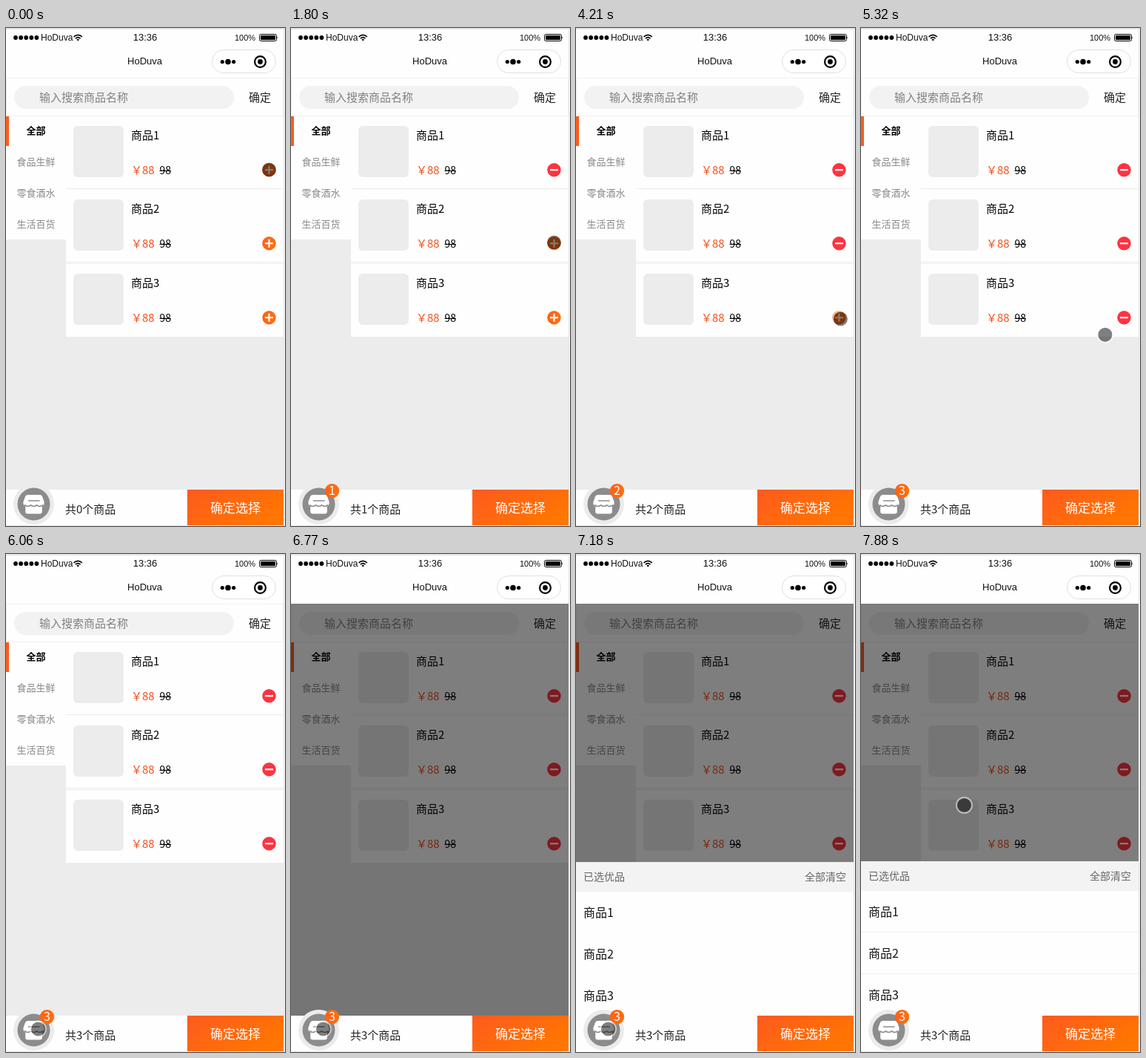
Write an HTML page that moves like this. It is 377x671 px and loops after 8 s.

```html
<!DOCTYPE html>
<html lang="zh">
<head>
<meta charset="utf-8">
<title>Shop picker</title>
<style>
html, body { margin: 0; width: 100%; height: 100%; overflow: hidden; background: #fff; }
svg { display: block; width: 100vw; height: 100vh; }
text { font-family: "Noto Sans CJK SC", "Noto Sans CJK JP", "Noto Sans CJK", sans-serif; font-size: 15px; fill: #111; }
.sys { font-family: "Liberation Sans", Arial, sans-serif; }
.mid { text-anchor: middle; }
.end { text-anchor: end; }
.grey { fill: #888; }
</style>
</head>
<body>
<svg viewBox="0 0 377 671" preserveAspectRatio="none">
  <defs>
    <linearGradient id="warm" x1="0" y1="0" x2="1" y2=".6">
      <stop offset="0" stop-color="#ff5a1f"/>
      <stop offset="1" stop-color="#ff7600"/>
    </linearGradient>
    <linearGradient id="disc" x1="0" y1="0" x2="1" y2="0">
      <stop offset="0" stop-color="#ff6216"/>
      <stop offset="1" stop-color="#ff700c"/>
    </linearGradient>
  </defs>

  <rect width="377" height="671" fill="#e6e6e6"/>
  <rect y="2" width="375" height="65" fill="#fefefe"/>
  <rect x="376" y="2" width="1" height="669" fill="#f6f6f6"/>
  <rect y="67" width="375" height="603" fill="#ececec"/>

  <!-- status bar -->
  <g id="signal"></g>
  <text class="sys" x="47" y="17" style="font-size:12px">HoDuva</text>
  <g fill="none" stroke="#000" stroke-width="1.7">
    <path d="M91.6 11.9Q97.2 6.9 102.8 11.9"/>
    <path d="M93.9 14.1Q97.2 11.1 100.5 14.1"/>
  </g>
  <path d="M95.4 15.4Q97.2 13.9 99 15.4L97.2 17.6Z"/>
  <text class="sys mid" x="188" y="17" style="font-size:13px">13:36</text>
  <text class="sys" x="309" y="17" style="font-size:11px">100%</text>
  <rect x="342.5" y="8.5" width="23" height="9" rx="2" fill="none" stroke="#000"/>
  <rect x="344" y="10" width="20" height="6" rx=".8"/>
  <path d="M366.5 11.2q1.6 1.8 0 3.6z"/>

  <!-- title bar -->
  <text class="sys mid" x="187.5" y="49" style="font-size:13px">HoDuva</text>
  <rect x="278.5" y="29.5" width="86" height="31" rx="15.5" fill="#fff" stroke="#e0e0e0"/>
  <circle cx="292.3" cy="45.5" r="2.6"/>
  <circle cx="300" cy="45.5" r="3.8"/>
  <circle cx="307.7" cy="45.5" r="2.6"/>
  <circle cx="343.5" cy="45.5" r="7.4" fill="none" stroke="#000" stroke-width="2.2"/>
  <circle cx="343.5" cy="45.5" r="3.4"/>

  <!-- search -->
  <rect x=".5" y="67.5" width="374" height="51" fill="#fefefe" stroke="#f1f1f1"/>
  <rect x="11" y="78" width="297" height="31" rx="15.5" fill="#f2f2f2"/>
  <text x="45" y="99" style="fill:#808080">输入搜索商品名称</text>
  <text x="328" y="99" style="fill:#222">确定</text>

  <!-- categories -->
  <rect y="119" width="81" height="166" fill="#fefefe"/>
  <rect y="119" width="4" height="40" fill="#ff5b1c"/>
  <g id="menu"></g>

  <g id="list"></g>
  <g id="mask"><rect y="67" width="375" height="555" fill="#000" opacity=".5"/></g>

  <!-- selection sheet -->
  <g id="sheet">
    <rect width="375" height="256" fill="#fefefe"/>
    <rect width="375" height="40" fill="#f3f3f3"/>
    <text x="10" y="25" style="font-size:14px;fill:#666">已选优品</text>
    <text class="end" x="365" y="25" style="font-size:14px;fill:#666">全部清空</text>
    <g id="picked"></g>
    <path id="rules" d="M0 95.5H375M0 151.5H375" stroke="#f0f0f0"/>
  </g>

  <!-- bottom bar -->
  <rect y="622" width="375" height="48" fill="#fefefe"/>
  <rect x="245" y="622" width="130" height="48" fill="url(#warm)"/>
  <text class="mid" x="310" y="653" style="font-size:17px;fill:#fff">确定选择</text>
  <text id="total" x="80" y="654" style="fill:#222"></text>
  <circle cx="37.5" cy="641.5" r="27.5" fill="#ebebeb"/>
  <circle cx="37.5" cy="641.5" r="22" fill="#8c8c8c"/>
  <path d="M30 629H45.5Q48 629 49 631.3L51.6 638.5Q52 643 48.8 644.3V651.5Q48.8 654.5 45.8 654.5H29.2Q26.2 654.5 26.2 651.5V644.3Q23 643 23.4 638.5L26 631.3Q27 629 30 629Z" fill="#fff"/>
  <path d="M30.5 637H45M25.5 642.8Q29.5 646.2 33.5 642.8Q37.5 646.2 41.5 642.8Q45.5 646.2 49.5 642.8" fill="none" stroke="#8c8c8c" stroke-width="1.6" stroke-linecap="round"/>
  <g id="badge">
    <circle cx="55.5" cy="623.7" r="9.7" fill="url(#disc)"/>
    <text id="count" class="mid" x="55.5" y="629.3" style="font-size:16px;fill:#fff"></text>
  </g>

  <g id="cursor">
    <circle r="9.6" fill="#000" opacity=".5"/>
    <circle r="10.5" fill="none" stroke="#fff" stroke-width="2" opacity=".5"/>
  </g>
</svg>
<script>
const LOOP = 8000;
const $ = id => document.getElementById(id);
const show = (el, on) => el.setAttribute("display", on ? "inline" : "none");
const place = (el, x, y) => el.setAttribute("transform", `translate(${x} ${y})`);
const each = (n, draw) => Array.from({ length: n }, (_, i) => draw(i)).join("");

$("signal").innerHTML = each(5, i => `<circle cx="${13 + i * 7.1}" cy="13" r="2.9"/>`);

$("menu").innerHTML = ["全部", "食品生鲜", "零食酒水", "生活百货"].map((name, i) =>
  `<text class="mid ${i ? "grey" : ""}" x="40.5" y="${143 + i * 42}"
    style="font-size:13px;${i ? "" : "font-weight:bold;fill:#000"}">${name}</text>`).join("");

const rowTop = i => Math.round(119 + i * 99.4);
$("list").innerHTML = each(3, i => `<g transform="translate(81 ${rowTop(i)})">
  <rect width="294" height="${i < 2 ? 99 : 98}" fill="#fefefe"/>
  ${i < 2 ? '<path d="M0 97.5H294" stroke="#ebebeb"/>' : ""}
  <rect x="10" y="13" width="68" height="69" rx="6" fill="#ececec"/>
  <text x="88" y="31" style="fill:#000">商品${i + 1}</text>
  <text x="88" y="78" style="fill:#f0521f">￥88</text>
  <text x="126.5" y="78" style="font-size:14px;fill:#000">98</text>
  <path d="M126.5 73.5H142" stroke="#000"/>
  <g transform="translate(274.5 72.2)" stroke="#fff" stroke-width="2.2">
    <circle id="disc${i}" r="9.2" stroke="none"/>
    <path d="M-5.5 0H5.5"/>
    <path id="bar${i}" d="M0 -5.5V5.5"/>
  </g>
</g>`);

$("picked").innerHTML = each(3, i =>
  `<text x="10" y="${74 + i * 56}" style="font-size:16px">商品${i + 1}</text>`);

const taps = [400, 2520, 4780];

// begin, end, steps, x, y
const home = [355.5, 191];
const moves = [
  [1110, 1800, 6, 355.5, 289],
  [3760, 4210, 4, 357.5, 392],
  [5190, 5750, 5, 92, 597],
  [5900, 6060, 2, 43.5, 640],
  [7300, 7720, 4, 139.5, 341.5],
  [7880, 7880, 1, 139.5, 338.5]
];

const smooth = p => p * p * (3 - 2 * p);

function cursorAt(t) {
  let [x, y] = home;
  for (const [begin, end, steps, tx, ty] of moves) {
    if (t < begin) break;
    const step = t >= end ? steps : Math.floor((t - begin) / (end - begin) * (steps - 1)) + 1;
    const p = smooth(step / steps);
    x += (tx - x) * p;
    y += (ty - y) * p;
  }
  return [x, y];
}

const OPEN = 6770, SLIDE = 6800, SETTLED = 7300;

function sheetTop(t) {
  if (t >= SETTLED) return 414;
  const p = Math.min(1, Math.max(0, (t - SLIDE) / 420));
  return 415 + 255 * (1 - p) ** 3;
}

function render(t) {
  const count = taps.filter(tap => t >= tap).length;
  for (let i = 0; i < 3; i++) {
    const chosen = i < count;
    $("disc" + i).setAttribute("fill", chosen ? "#ff3340" : "url(#disc)");
    show($("bar" + i), !chosen);
  }
  $("total").textContent = `共${count}个商品`;
  $("count").textContent = count;
  show($("badge"), count > 0);
  show($("mask"), t >= OPEN);
  show($("sheet"), t >= SLIDE);
  show($("rules"), t >= SETTLED);
  place($("sheet"), 0, sheetTop(t));
  place($("cursor"), ...cursorAt(t));
}

const start = performance.now();
function tick() {
  render((performance.now() - start) % LOOP);
  requestAnimationFrame(tick);
}
tick();
</script>
</body>
</html>
```
